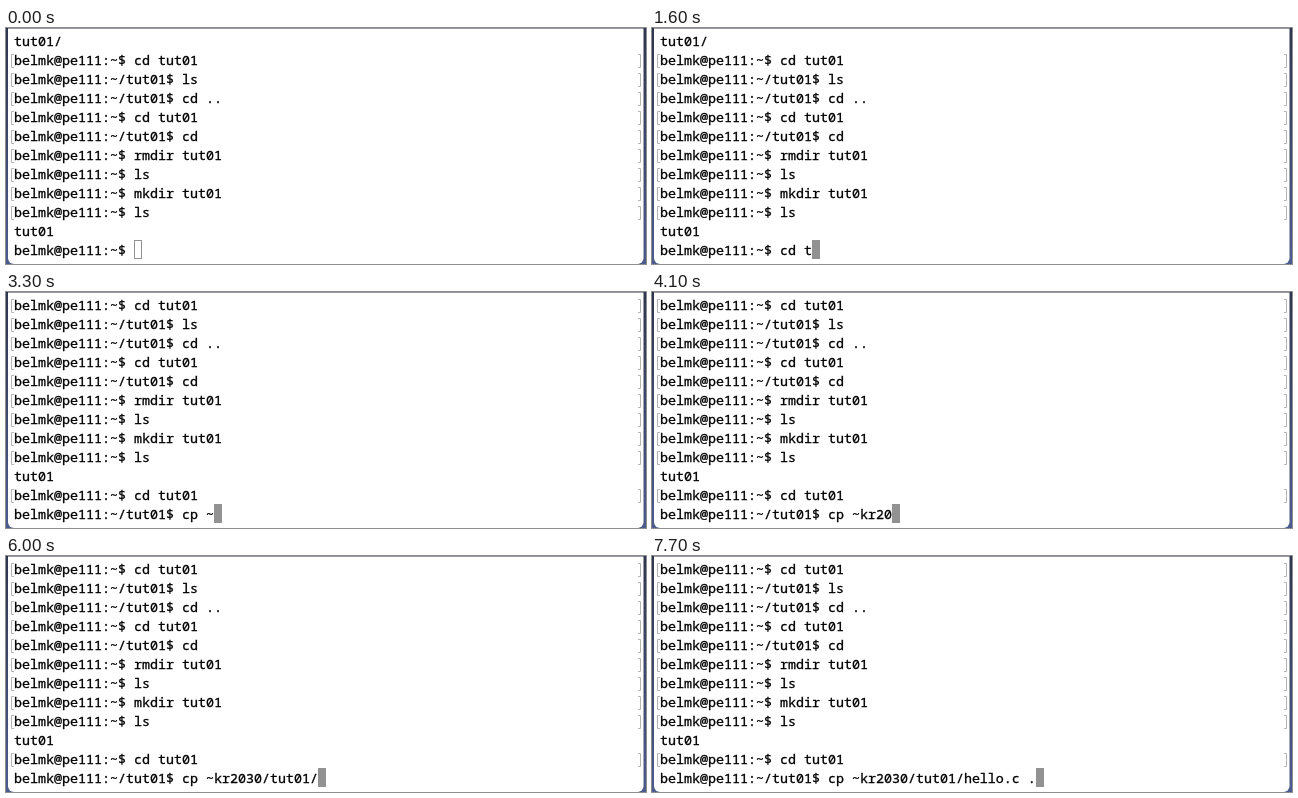
These frames come from a looping animation (640x236 px, 8 s). An HTML page with a canvas:

```html
<!DOCTYPE html>
<html lang="en">
<head>
<meta charset="utf-8">
<title>Terminal</title>
<style>
  html, body { margin: 0; width: 640px; height: 236px; overflow: hidden; background: #fff; }
  canvas, pre { position: absolute; left: 0; top: 0; margin: 0; }
  pre {
    left: 8px; top: 4px; color: #000;
    font: 13.333px/19px "Noto Sans Mono", "DejaVu Sans Mono", monospace;
    font-variant-ligatures: none;
    -webkit-text-stroke: 0.3px #000;
  }
</style>
</head>
<body>
<canvas id="stage" width="640" height="236"></canvas>
<pre id="text"></pre>
<script>
const LOOP = 8000, FOCUS = 400, ENTER = 2300;
const ROWS = 12, ROW = 19, COL = 8, LEFT = 8, TOP = 3;
const ctx = document.getElementById('stage').getContext('2d');
const text = document.getElementById('text');

const home = 'belmk@pe111:~$ ';
const tut = 'belmk@pe111:~/tut01$ ';
const history = [
  'tut01/',
  home + 'cd tut01',
  tut + 'ls',
  tut + 'cd ..',
  home + 'cd tut01',
  tut + 'cd',
  home + 'rmdir tut01',
  home + 'ls',
  home + 'mkdir tut01',
  home + 'ls',
  'tut01'
];

// Bursts of typing: start time, ms per key, characters
const first = [
  { at: 1400, step: 66, keys: 'cd t' },
  { at: 1900, step: 100, keys: 'ut01' }
];
const second = [
  { at: 2500, step: 266, keys: 'cp ~' },
  { at: 3500, step: 171, keys: 'kr2030/t' },
  { at: 5000, step: 100, keys: 'ut01/' },
  { at: 6100, step: 200, keys: 'hello.c .' }
];

function typed(bursts, t) {
  return bursts.map(({ at, step, keys }) =>
    keys.slice(0, Math.max(0, Math.floor((t - at) / step) + 1))).join('');
}

function linesAt(t) {
  const lines = [...history, home + typed(first, t)];
  if (t >= ENTER) lines.push(tut + typed(second, t));
  return lines.slice(-ROWS);
}

function drawWindow() {
  const desk = ctx.createLinearGradient(0, 0, 0, 236);
  desk.addColorStop(0, '#30364f');
  desk.addColorStop(1, '#4d5c8e');
  ctx.fillStyle = desk;
  ctx.fillRect(0, 0, 640, 236);
  ctx.fillStyle = '#fff';
  ctx.beginPath();
  ctx.roundRect(2, 0.5, 635.5, 235.5, [0, 0, 6, 6]);
  ctx.fill();
}

function drawBracket(x, y, dir) {
  ctx.beginPath();
  ctx.moveTo(x + 2.5 * dir, y + 4.5);
  ctx.lineTo(x, y + 4.5);
  ctx.lineTo(x, y + 17.5);
  ctx.lineTo(x + 2.5 * dir, y + 17.5);
  ctx.stroke();
}

function drawCursor(col, focused) {
  const x = LEFT + col * COL, y = TOP + (ROWS - 1) * ROW;
  ctx.fillStyle = ctx.strokeStyle = '#929292';
  if (focused) ctx.fillRect(x, y, COL, ROW);
  else ctx.strokeRect(x + 0.5, y + 0.5, COL - 1, ROW - 1);
}

function draw(t) {
  const lines = linesAt(t);
  drawWindow();
  ctx.strokeStyle = '#b4b4b4';
  lines.slice(0, -1).forEach((line, i) => {
    if (!line.includes('$')) return;
    drawBracket(5.5, TOP + i * ROW, 1);
    drawBracket(634.5, TOP + i * ROW, -1);
  });
  drawCursor(lines[ROWS - 1].length, t >= FOCUS);
  const content = lines.join('\n');
  if (text.textContent !== content) text.textContent = content;
}

function frame(now) {
  draw(now % LOOP);
  requestAnimationFrame(frame);
}
frame(0);
</script>
</body>
</html>
```
